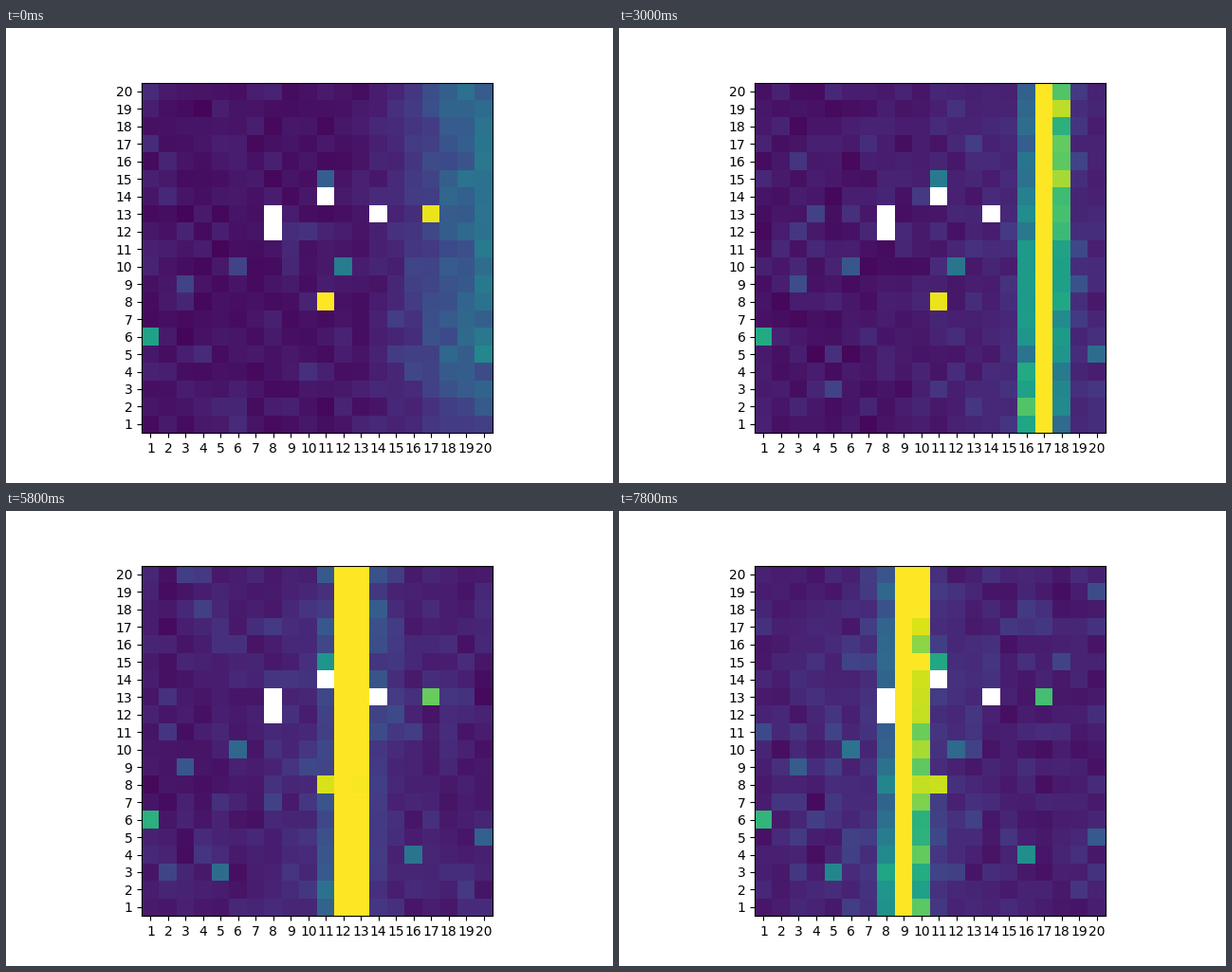
Write a matplotlib script that moves like this. It is 640 px wide and 480 px high and loops after 8 s.

```python
import numpy as np
import matplotlib.pyplot as plt
from matplotlib.animation import FuncAnimation

N = 20
FRAMES = 40
STEP = 200  # ms

x, y = np.meshgrid(np.arange(1, N + 1), np.arange(1, N + 1))

# Blocked cells stay empty
HOLES = [(8, 12), (8, 13), (11, 14), (14, 13)]

# Bright cells: column, row, level at the start and at the end
SPOTS = [
    (1, 6, 0.58, 0.66),
    (11, 8, 1.0, 0.92),
    (17, 13, 0.97, 0.7),
    (12, 10, 0.42, 0.34),
    (6, 10, 0.2, 0.38),
    (3, 9, 0.2, 0.29),
    (11, 15, 0.3, 0.6),
    (20, 5, 0.4, 0.28),
    (16, 4, 0.05, 0.5),
    (5, 3, 0.04, 0.46),
]


def front(t):
    """Slightly tilted wave front travelling left at constant speed."""
    center = 17.05 - 1.64 * (t - 3) + 0.015 * (y - 10.5)
    d = np.abs(x - center)
    return 1.9 * np.exp(-1.6 * d**2) + 0.13 * np.exp(-d / 3)


def glow(t):
    """Early brightening of the right side that fades as the front enters."""
    ramp = np.clip((x - 13) / 6, 0, 1.1) ** 1.3
    rows = np.clip((y + 1) / 6, 0.4, 1)
    return 0.22 * ramp * rows * max(0, 1 - t / 2)


def field(i):
    t = i * STEP / 1000
    rng = np.random.default_rng(100 + i)
    base = (0.055 + 0.003 * t) * rng.gamma(6, 1 / 6, (N, N))
    grain = 1 + 0.14 * rng.standard_normal((N, N))
    z = base + (front(t) + glow(t)) * grain
    for cx, cy, start, end in SPOTS:
        level = start + (end - start) * i / (FRAMES - 1)
        z[cy - 1, cx - 1] = max(z[cy - 1, cx - 1], level)
    for cx, cy in HOLES:
        z[cy - 1, cx - 1] = np.nan
    return z


fig, ax = plt.subplots(figsize=(6.4, 4.8), dpi=100)
image = ax.imshow(field(0), origin="lower", cmap="viridis", vmin=0, vmax=1)
ticks = np.arange(N)
ax.set_xticks(ticks, labels=ticks + 1)
ax.set_yticks(ticks, labels=ticks + 1)


def update(i):
    image.set_data(field(i))
    return [image]


anim = FuncAnimation(fig, update, frames=FRAMES, interval=STEP,
                     repeat=True, repeat_delay=0)
plt.show()
```
